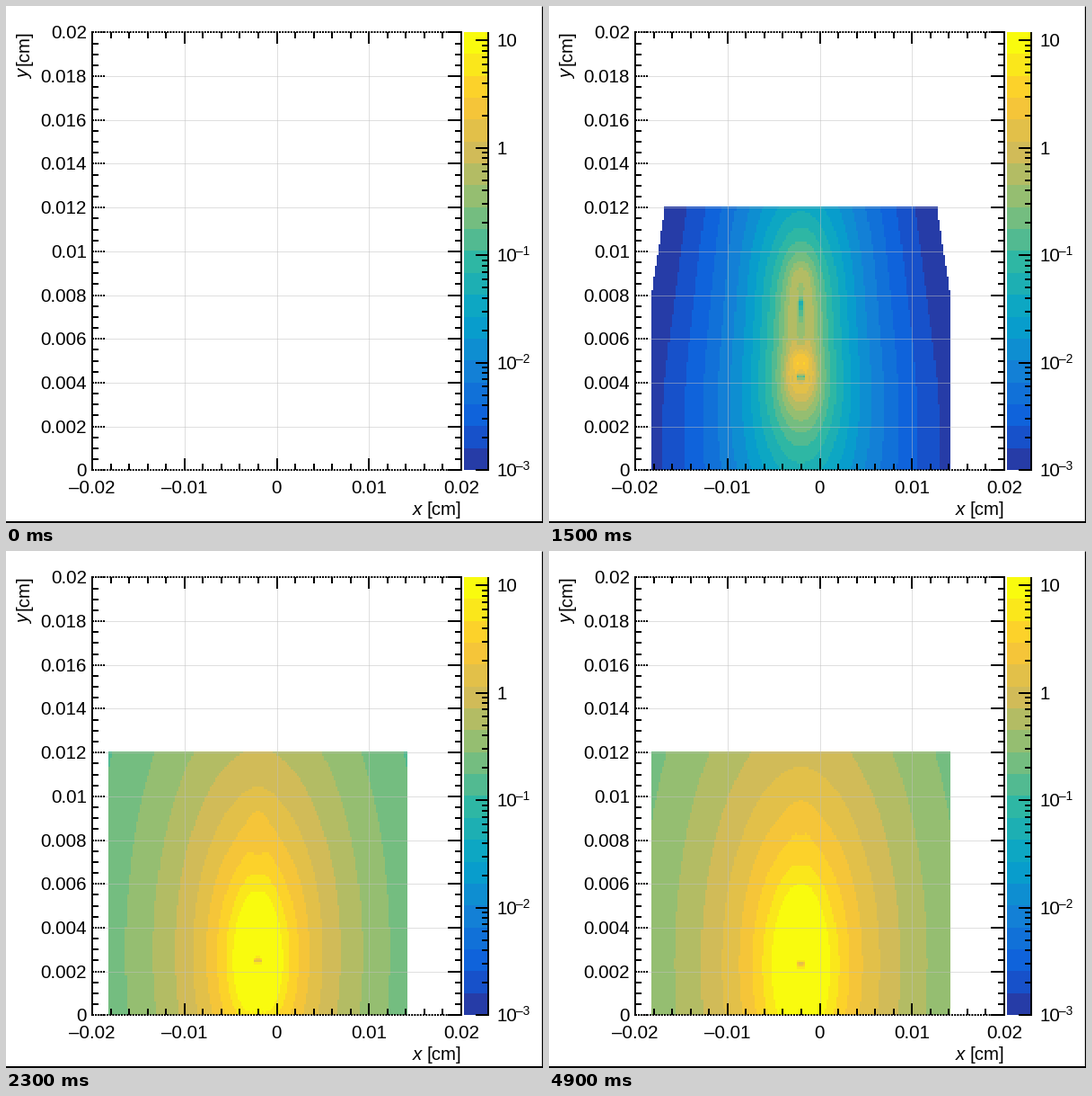
A matplotlib script that plays this animation: 598x575 px, repeating every 5000 ms.

```python
import numpy as np
import matplotlib.pyplot as plt
from matplotlib.animation import FuncAnimation
from matplotlib.colors import LinearSegmentedColormap, ListedColormap

W, H = 598, 575
PX = 0.72                       # points per pixel at 100 dpi
LEFT, RIGHT, TOP, BOTTOM = 96, 507, 29.4, 516.3
LEVELS, DECADE = 20, 119.5
FONT = 20.5 * PX

plt.rcParams["font.family"] = "Liberation Sans"
fig = plt.figure(figsize=(W / 100, H / 100), dpi=100, facecolor="white")
ax = fig.add_axes([0, 0, 1, 1])
ax.axis("off")

stops = "#352a87 #0f5cdd #1481d6 #06a4ca #2eb7a4 #87bf77 #d1bb59 #fec832 #f9fb0e"
smooth = LinearSegmentedColormap.from_list("bird", stops.split(), 255)
bands = ListedColormap([smooth(int((i + .99) * 255 / LEVELS)) for i in range(LEVELS)])
bands.set_bad((1, 1, 1, 0))


def sx(x):
    return LEFT + (x + .02) / .04 * (RIGHT - LEFT)


def sy(y):
    return BOTTOM - y / .02 * (BOTTOM - TOP)


def line(x0, y0, x1, y1, width=2, color="black", dash=None, z=4):
    style = "-" if dash is None else (0, dash)
    ax.plot([x0, x1], [y0, y1], color=color, lw=width * PX, ls=style,
            solid_capstyle="butt", dash_capstyle="butt", zorder=z)


def label(x, y, text, ha="center", size=FONT, **kw):
    ax.text(x, y, text, ha=ha, va="center_baseline", fontsize=size, **kw)


def num(v):
    return f"{v:.3f}".rstrip("0").rstrip(".").replace("-", "–") if v else "0"


def draw_grid():
    for i in range(1, 4):
        x = sx(-.02 + .01 * i)
        line(x, TOP, x, BOTTOM, 1, "#c0c0c0", (1, 1), 3)
    for i in range(1, 10):
        y = sy(.002 * i)
        line(LEFT, y, RIGHT, y, 1, "#c0c0c0", (1, 1), 3)


def draw_axes():
    for x in (LEFT, RIGHT):
        line(x, TOP - 1, x, BOTTOM + 1)
    for y in (TOP, BOTTOM):
        line(LEFT, y, RIGHT, y, 2, dash=(1, .6))

    for i in range(21):
        x, n = sx(-.02 + .002 * i), 13 if i % 5 == 0 else 7
        line(x, BOTTOM, x, BOTTOM - n)
        line(x, TOP, x, TOP + n)
    for i in range(41):
        y, major = sy(.0005 * i), i % 4 == 0
        n = 15 if major else 7
        line(LEFT, y, LEFT + n, y, dash=(1, .5) if major else None)
        line(RIGHT, y, RIGHT - n, y)

    for i in range(-2, 3):
        label(sx(.01 * i), 534, num(.01 * i))
    for i in range(11):
        label(90, sy(.002 * i) - .5, num(.002 * i), "right")

    label(507, 559, "[cm]", "right")
    label(463, 559, "x", "right", style="italic")
    title = dict(rotation=90, ha="center", va="top", fontsize=FONT)
    ax.text(20, 27, "[cm]", **title)
    ax.text(21, 71, "y", style="italic", **title)


def draw_scale():
    strip = np.arange(LEVELS)[::-1, None]
    ax.imshow(strip, cmap=bands, vmin=-.5, vmax=LEVELS - .5, aspect="auto",
              extent=(510, 537, BOTTOM, TOP), interpolation="nearest", zorder=2)
    line(537, TOP, 537, BOTTOM + 1)
    for d in range(5):
        for m in range(1, 10):
            y = BOTTOM - DECADE * (d + np.log10(m))
            if y >= TOP:
                line(537, y, 523 if m == 1 else 530, y)
        y = BOTTOM - DECADE * d - .5
        label(547, y, "1" if d == 3 else "10", "left")
        if d < 3:
            label(568.5, y - 5, f"–{3 - d}", "left", FONT * .67)


# Field of ring charges around the avalanche axis, one stack entry per height
K = 1.44e-7
AXIS, HALF, GAP = -.002, .0162, .012
NX, NY, NSRC = 162, 120, 60
rng = np.random.default_rng(4)
gx = (np.arange(NX) + .5) * 2 * HALF / NX - HALF
gy = (np.arange(NY) + .5) * GAP / NY
X, Y = np.meshgrid(gx, gy)
edges = np.linspace(0, GAP, NSRC + 1)
src = (edges[1:] + edges[:-1]) / 2


def ring_field(y0):
    size = (.0012 - .065 * y0) * rng.uniform(.85, 1.15)
    out = np.zeros((2, NY, NX))
    for r in (size * .45, size):
        for a in (np.arange(6) + .5) * np.pi / 6:
            dx, dy, dz = X - r * np.cos(a), Y - y0, r * np.sin(a)
            d3 = (dx**2 + dy**2 + dz**2 + 2.5e-8) ** 1.5
            out += K / 12 * np.array([dx / d3, dy / d3])
    return out


kernel = np.array([ring_field(y) for y in src])


def made_above(y):
    """Ions produced above height y: a thin early trail, then saturating growth."""
    trail = 2500 * np.maximum(.0088 - y, 0)
    return trail + 580 / (1 + np.exp((y - .0022) / .0006))


ions_all = -np.diff(made_above(edges))
ions_all *= 1 + rng.uniform(-1, 1, NSRC) * np.minimum(.5, (src / .006) ** 2 / 2)


def sigmoid(t):
    return 1 / (1 + np.exp(-np.clip(t, -50, 50)))


def charges(k):
    front = min(.0117, .0108 - .0008 * (k - 4))
    width = .00011 * 1.15 ** (min(k, 22) - 4)
    ions = ions_all * sigmoid(1.7 * (src - front) / width)
    cloud = np.exp(-.5 * ((src - max(front, .0005)) / width) ** 2)
    left = sigmoid((19.3 - k) / .9)
    electrons = cloud / cloud.sum() * (ions.sum() + 1) * left
    drift = 2e-6 * max(0, k - 22)
    return np.interp(src - drift, src, ions) - electrons


def field_bands(k):
    if k == 0:
        return np.ma.masked_all((NY, NX))
    fx, fy = np.tensordot(charges(k), kernel, 1)
    height = (np.log10(np.hypot(fx, fy) + 1e-12) + 3) * DECADE
    level = np.floor(height / (BOTTOM - TOP) * LEVELS)
    return np.ma.masked_less(np.minimum(level, LEVELS - 1), 0)


heat = ax.imshow(field_bands(0), cmap=bands, vmin=-.5, vmax=LEVELS - .5,
                 aspect="auto", origin="lower", interpolation="nearest",
                 extent=(sx(AXIS - HALF), sx(AXIS + HALF), sy(0), sy(GAP)),
                 zorder=1)
draw_grid()
draw_axes()
draw_scale()
line(597.3, 0, 597.3, H, 1.4)
line(0, 574, W, 574, 2)
ax.set_xlim(0, W)
ax.set_ylim(H, 0)


def update(i):
    heat.set_data(field_bands(max(0, i - 3)))
    return [heat]


anim = FuncAnimation(fig, update, frames=50, interval=100, repeat=True,
                     repeat_delay=0)
plt.show()
```
